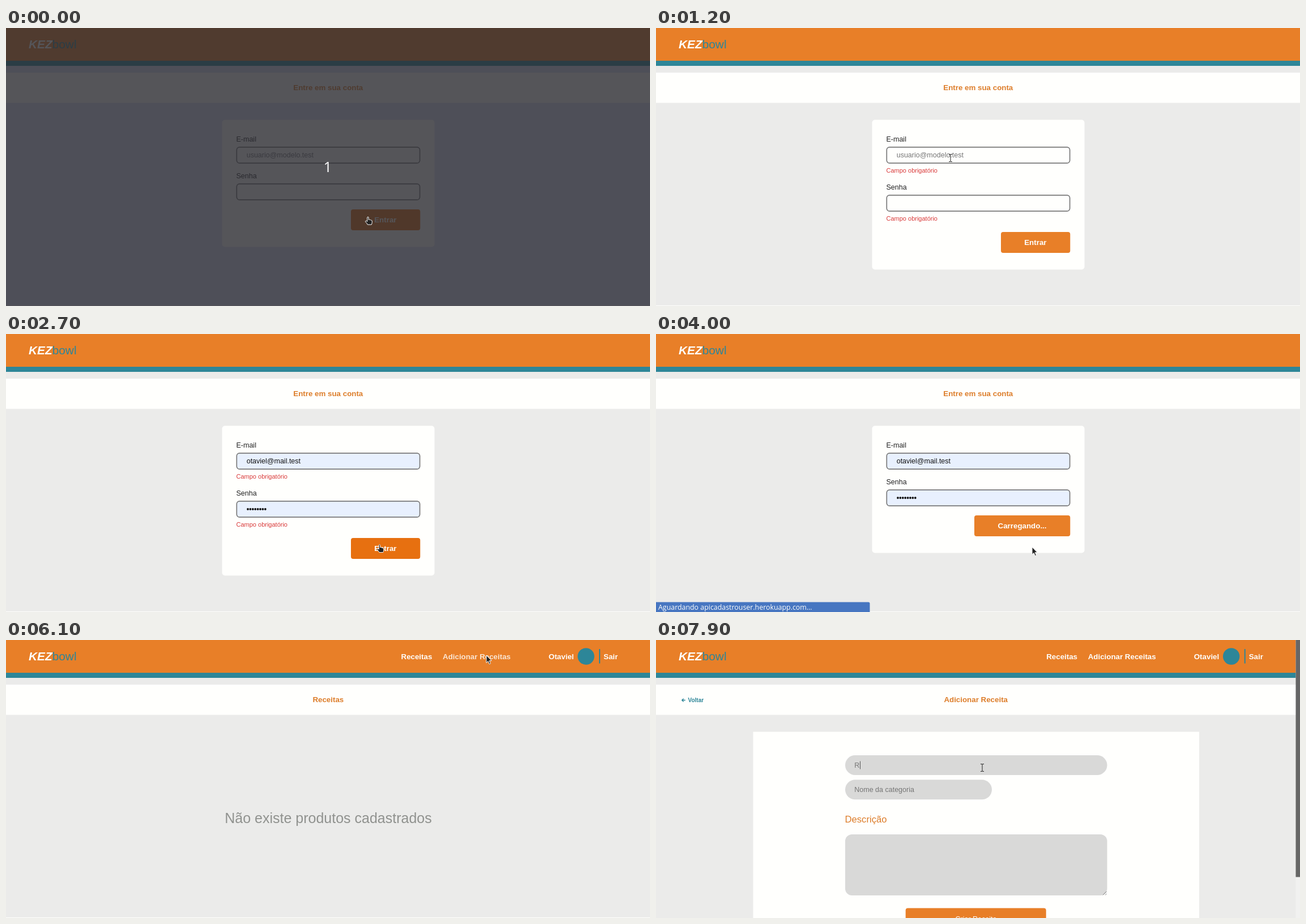
Animation of 1137x492 px, one loop 8 s. Source, as an HTML page:

```html
<!DOCTYPE html>
<html lang="pt-BR">
<head>
<meta charset="utf-8">
<title>Login e cadastro de receitas</title>
<style>
  html, body { margin: 0; width: 100%; height: 100%; overflow: hidden; background: #ebebea; }
  svg { display: block; width: 100vw; height: 100vh; font: 12.5px "Liberation Sans", Arial, sans-serif; }
  .bold { font-weight: bold; font-size: 13.33px; }
  .orange { fill: #e87f28; }
  .title { fill: #dd7d2a; text-anchor: middle; }
  .teal { fill: #2d8698; }
  .white { fill: #fffffd; }
  .dark { fill: #212121; }
  .hint { fill: #757575; }
  .gray { fill: #d9d9d8; }
  .field { fill: #fffffd; stroke: #7a7a7a; stroke-width: 1.7; }
  .error { fill: #d93a3a; font-size: 11px; }
  .dots { fill: none; stroke: #111; stroke-linecap: round; }
  .menu text { font: 14px Lato, "Open Sans", sans-serif; }
  .arc { fill: none; stroke-width: 15; stroke-linecap: round; }
  .caret { stroke: #555; stroke-width: 1; }
  .pointer { fill: #222; stroke: #fff; stroke-width: 1; stroke-linejoin: round; }
</style>
</head>
<body>
<svg viewBox="0 0 1137 492" preserveAspectRatio="none">
  <rect id="page" width="1137" height="492"/>
  <rect class="orange" width="1137" height="58"/>
  <rect class="teal" y="58" width="1137" height="9"/>
  <rect class="white" y="79" width="1137" height="53.5"/>
  <rect id="edge" class="white" y="491" width="1137" height="1"/>
  <text y="36" font-size="20.83"><tspan x="40" class="white" font-weight="bold" font-style="italic">KEZ</tspan><tspan class="teal">bowl</tspan></text>
  <text id="title" class="bold title" y="110"></text>

  <g id="nav" class="bold white">
    <text x="697.5" y="34">Receitas</text>
    <text id="addLink" x="771" y="34">Adicionar Receitas</text>
    <text x="1002.5" y="34" text-anchor="end">Otaviel</text>
    <circle class="teal" cx="1024" cy="29" r="14.7"/>
    <rect class="teal" x="1047" y="16" width="2" height="25.5"/>
    <text x="1055" y="34">Sair</text>
  </g>

  <g id="login">
    <rect id="card" class="white" x="381.5" y="162.5" width="375" rx="5"/>
    <text class="dark" x="406.5" y="201">E-mail</text>
    <rect id="emailBox" class="field" x="407.3" y="210.8" width="323.3" height="28.4" rx="5"/>
    <text id="email" x="424.7" y="229"></text>
    <path id="emailCaret" class="caret" d="M425.5 217.5V232"/>
    <text id="emailError" class="error" x="406.5" y="256">Campo obrigatório</text>
    <g id="password">
      <text class="dark" x="406.5" y="266">Senha</text>
      <rect id="passwordBox" class="field" x="407.3" y="275.8" width="323.3" height="28.4" rx="5"/>
      <path id="passwordDots" class="dots" stroke-width="3.8" stroke-dasharray="0 4.4" d="M427 290H458"/>
      <text id="passwordError" class="error" x="406.5" y="321">Campo obrigatório</text>
    </g>
    <g id="submit">
      <rect id="submitBox" y="321" height="37" rx="4"/>
      <text id="submitText" class="bold white" x="689.5" y="344" text-anchor="end"></text>
    </g>
    <g id="menu" class="menu dark">
      <rect x="405.5" y="243" width="327" height="143.5" rx="2" fill="#000" opacity=".12"/>
      <rect x="406" y="244" width="326" height="141.8" rx="2" fill="#000" opacity=".2"/>
      <rect class="white" x="406.5" y="241" width="325" height="143.5"/>
      <rect id="highlight" x="406.5" y="247" width="325" height="48.5" fill="#c5c6c4"/>
      <g fill="#5fb9cf"><rect x="417" y="265" width="13" height="13"/><rect x="417" y="313" width="13" height="13"/></g>
      <text x="440" y="266">otaviel@mail.test</text>
      <path class="dots" stroke-width="4" stroke-dasharray="0 5" d="M442.3 281.5H477.5"/>
      <text x="440" y="315">otavielpran482@mail.test</text>
      <path class="dots" stroke-width="4" stroke-dasharray="0 5" d="M442.3 329.5H487.5"/>
      <rect x="406.5" y="350" width="325" height="1.4" fill="#d8d8d7"/>
      <text x="416.5" y="373">Gerenciar senhas…</text>
    </g>
  </g>

  <g id="status">
    <path d="M0 474.5H375q2.5 0 2.5 2.5V492H0Z" fill="#4776c1"/>
    <text class="white" x="4" y="488" style="font:12.4px 'Open Sans',sans-serif">Aguardando apicadastrouser.herokuapp.com…</text>
  </g>

  <g id="spinner">
    <path id="lightArc" class="arc" stroke="#78bed2"/>
    <path id="darkArc" class="arc" stroke="#2d8698"/>
  </g>
  <text id="empty" x="569" y="324" text-anchor="middle" font-size="25" fill="#90928f">Não existe produtos cadastrados</text>

  <g id="form">
    <path d="M51.8 106.5H46M48.7 103.7L45.8 106.5L48.7 109.3" fill="none" stroke="#2d8698" stroke-width="1.4"/>
    <text class="teal" x="56.5" y="110" font-size="10" font-weight="bold">Voltar</text>
    <rect class="white" x="171.5" y="162.5" width="787.5" height="330"/>
    <rect class="gray" x="334" y="204" width="462.5" height="35" rx="17.5"/>
    <rect class="gray" x="334" y="247.3" width="259" height="35" rx="17.5"/>
    <text id="recipe" class="hint" x="350.3" y="226"></text>
    <path id="recipeCaret" class="caret"/>
    <text class="hint" x="350.3" y="269">Nome da categoria</text>
    <text x="333.5" y="323" font-size="16.67" fill="#dd7d2a">Descrição</text>
    <rect class="gray" x="334" y="344" width="462.5" height="108" rx="12"/>
    <path d="M789 451.5L795.5 445M793 451.5L795.5 449" stroke="#555" stroke-width=".8"/>
    <rect class="orange" x="440.7" y="474.5" width="248" height="40" rx="4"/>
    <text class="white" x="565" y="498" text-anchor="middle">Criar Receita</text>
    <rect x="1129.5" width="8" height="492" fill="#f1f1f0"/>
    <rect x="1129.5" width="8" height="419.5" fill="#666"/>
  </g>

  <g id="intro">
    <rect width="1137" height="492" fill="#2b2b31" opacity=".8"/>
    <text x="568" y="255" text-anchor="middle" fill="#fff" style="font:26px 'Open Sans',sans-serif">1</text>
  </g>

  <g id="cursor" class="pointer">
    <path id="arrow" d="M0 0V13.4L3.1 10.5L5.3 15.6L7.5 14.6L5.3 9.7H9.3Z"/>
    <path id="hand" d="M-1.2 1Q0-.8 1.2 1V5.3Q2.6 4.3 3.3 5.6Q4.8 4.9 5.4 6.2Q7.2 5.8 7.3 7.6V10.5Q7.2 12 6.2 14H-.6Q-1.6 11.6-4.2 9.2Q-5.2 7.6-3.6 7.2Q-2.4 7.2-1.2 8.6Z"/>
    <path id="beam" d="M-3-6.5H-.8L0-6L.8-6.5H3M-3 6.5H-.8L0 6L.8 6.5H3M0-6V6" fill="none" stroke="#222"/>
  </g>
</svg>
<script>
const LOOP = 8000, STEP = 100;
const ui = {};
document.querySelectorAll('[id]').forEach(el => ui[el.id] = el);

// time, x, y, shape; the pointer moves in straight lines between stops
const stops = [
  [0, 639, 334, 'hand'], [600, 638, 334, 'arrow'], [700, 638, 334, 'arrow'], [900, 557, 266, 'arrow'],
  [1000, 557, 266, 'arrow'], [1200, 520, 230, 'beam'], [1500, 510, 226, 'beam'],
  [1700, 510, 226, 'beam'], [1900, 508, 238, 'arrow'], [2000, 508, 238, 'arrow'],
  [2200, 515, 265, 'arrow'], [2500, 655, 368, 'hand'], [2600, 655, 368, 'hand'],
  [2800, 664, 377, 'arrow'], [4600, 664, 377, 'arrow'], [4800, 690, 335, 'arrow'],
  [5100, 800, 130, 'arrow'], [5400, 849, 27, 'hand'], [6100, 848, 27, 'arrow'],
  [6200, 848, 27, 'arrow'], [6500, 720, 130, 'arrow'], [6800, 576, 226, 'beam'], [LOOP, 576, 226, 'beam']
];

const show = (el, on) => el.style.display = on ? '' : 'none';
const attr = (el, values) => { for (const k in values) el.setAttribute(k, values[k]); };
const write = (el, text) => { if (el.textContent !== text) el.textContent = text; };

function arc(from, to) {
  const point = deg => {
    const a = deg * Math.PI / 180;
    return `${569 + 67.3 * Math.cos(a)} ${304 + 67.3 * Math.sin(a)}`;
  };
  return `M${point(from)}A67.3 67.3 0 ${to - from > 180 ? 1 : 0} 1 ${point(to)}`;
}

function drawCursor(t) {
  const i = stops.findIndex(s => s[0] > t) - 1;
  const [t0, x0, y0, shape] = stops[i], [t1, x1, y1] = stops[i + 1];
  const k = (t - t0) / (t1 - t0);
  attr(ui.cursor, { transform: `translate(${x0 + (x1 - x0) * k} ${y0 + (y1 - y0) * k})` });
  for (const name of ['arrow', 'hand', 'beam']) show(ui[name], name === shape);
}

function drawLogin(t) {
  const invalid = t >= 600 && t < 2800, preview = t >= 2100 && t < 2300;
  const filled = t >= 2100, loading = t >= 2800;
  const hover = t < 600 || (t >= 2500 && t < 2800);
  const shift = invalid ? 20 : 0;
  attr(ui.card, { height: 225 + 2 * shift });
  attr(ui.password, { transform: `translate(0 ${shift})` });
  attr(ui.submit, { transform: `translate(0 ${2 * shift})` });
  show(ui.emailError, invalid);
  show(ui.passwordError, invalid);
  show(ui.passwordDots, filled);
  show(ui.emailCaret, t >= 1300 && t < 2100);
  show(ui.menu, t >= 1400 && t < 2300);
  show(ui.highlight, t >= 1800);
  write(ui.email, filled ? 'otaviel@mail.test' : 'usuario@modelo.test');
  ui.email.style.fill = filled && !preview ? '#111' : '#757575';
  ui.emailBox.style.fill = ui.passwordBox.style.fill = filled ? '#e8f0fe' : '#fffffd';
  attr(ui.submitBox, {
    x: loading ? 562 : 609, width: loading ? 169.3 : 122.3, fill: hover ? '#e77010' : '#e87f28'
  });
  write(ui.submitText, loading ? 'Carregando...' : 'Entrar');
}

function drawSpinner(t) {
  const start = 66 + (t - 4600) * 0.36;
  attr(ui.darkArc, { d: arc(start, start + 178) });
  attr(ui.lightArc, { d: arc(start - 5, start + 90) });
}

function drawForm(t) {
  const typed = t >= 7900;
  write(ui.recipe, typed ? 'R' : 'Nome da receita');
  attr(ui.recipeCaret, { d: `M${typed ? 360.5 : 351.5} 214.5V228.5` });
  show(ui.recipeCaret, typed || (t >= 6900 && t < 7400));
}

function render(ms) {
  const t = Math.floor(ms / STEP) * STEP;
  const login = t < 4100, form = t >= 6300, loading = !login && t < 4900;
  attr(ui.page, { fill: t < 400 ? '#dfe4f4' : '#ebebea' });
  attr(ui.title, { x: form ? 564.7 : 568.8 });
  write(ui.title, login ? 'Entre em sua conta' : form ? 'Adicionar Receita' : 'Receitas');
  attr(ui.nav, { transform: `translate(${form ? -8.3 : 0} 0)` });
  attr(ui.addLink, { opacity: t >= 5400 && !form ? 0.8 : 1 });
  show(ui.edge, !form);
  show(ui.intro, t < 400);
  show(ui.login, login);
  show(ui.nav, !login);
  show(ui.status, t >= 4000 && t < 4200);
  show(ui.spinner, loading);
  show(ui.empty, t >= 4900 && !form);
  show(ui.form, form);
  if (login) drawLogin(t);
  if (loading) drawSpinner(t);
  if (form) drawForm(t);
  drawCursor(t);
}

const start = performance.now();
function tick(now) {
  render(Math.max(0, now - start) % LOOP);
  requestAnimationFrame(tick);
}
render(0);
requestAnimationFrame(tick);
</script>
</body>
</html>
```
